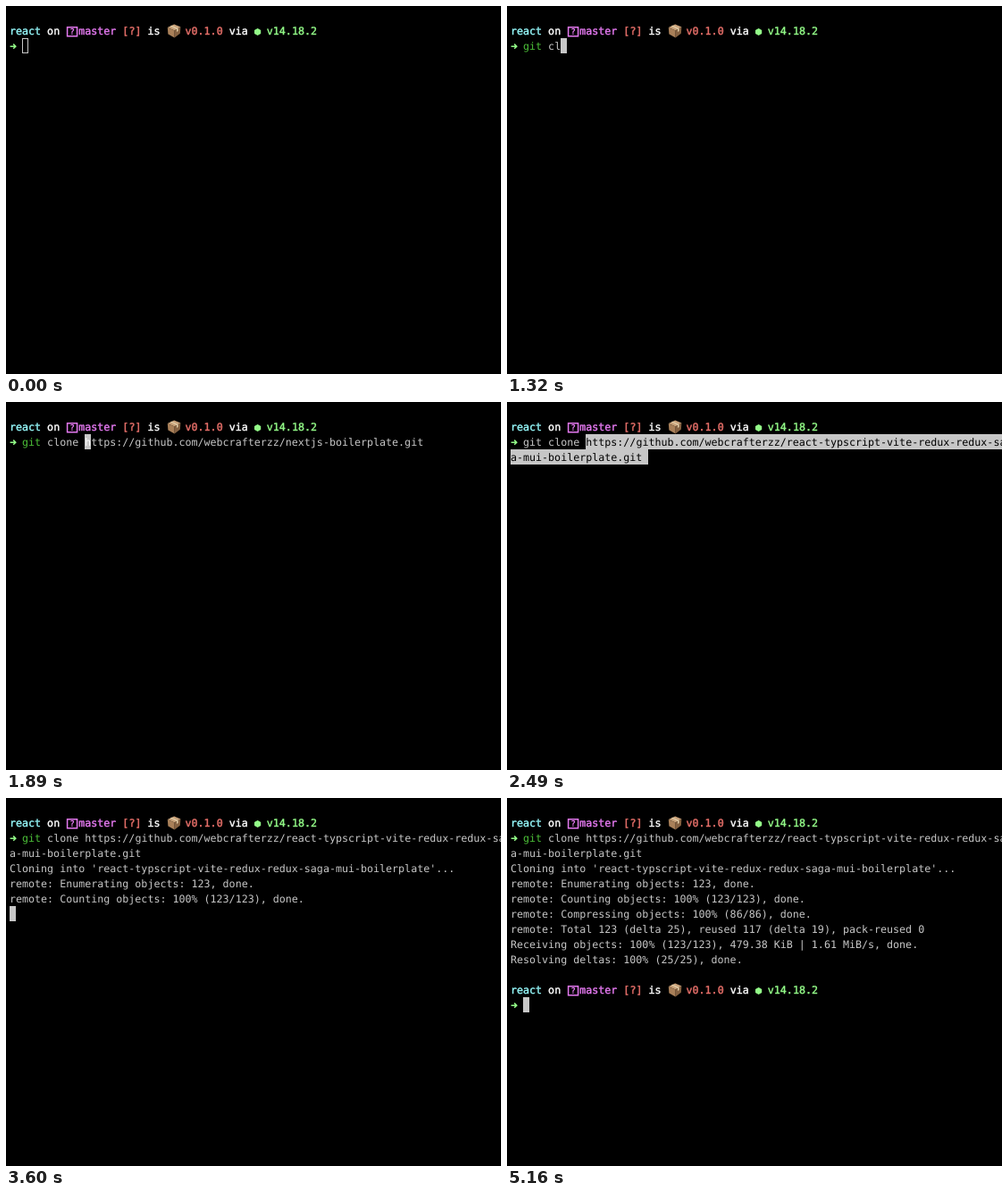
Animation, 554 px wide and 412 px high, one loop 5730 ms. Source, as an HTML page:

```html
<!DOCTYPE html>
<html lang="en">
<head>
<meta charset="utf-8">
<title>Terminal</title>
<style>
  html, body { margin: 0; width: 100%; height: 100%; overflow: hidden; background: #000; }
  #term {
    position: relative; width: 554px; height: 412px; overflow: hidden; background: #000;
    font: 11.66px/19px "DejaVu Sans Mono", monospace;
    color: #c7c7c7; text-rendering: geometricPrecision; font-variant-ligatures: none;
  }
  #term > * { position: absolute; height: 17px; white-space: pre; }
  .bold { -webkit-text-stroke: .4px currentColor; }
  .white { color: #fff; }
  .cyan { color: #96fafc; }
  .pink { color: #e67af2; }
  .red { color: #e8706a; }
  .lime { color: #93fb88; }
  .green { color: #4cc038; }
  .pasted { background: #c7c7c7; color: #000; }
  .block { width: 7px; background: #c7c7c7; color: #fff; }
  .hollow { width: 7px; box-sizing: border-box; border: 1px solid #c7c7c7; }
  svg { overflow: visible; }
</style>
</head>
<body>
<div id="term"></div>
<script>
const LOOP = 5730, CELL = 7.02, LINE = 17, LEFT = 4, TOP = 19;
const term = document.getElementById('term');
const items = [];

function place(el, row, col, from, to) {
  el.style.left = LEFT + col * CELL + 'px';
  el.style.top = TOP + row * LINE + 'px';
  term.append(el);
  items.push({ el, from, to });
}

function put(row, col, text, cls = '', from = 0, to = LOOP) {
  const el = document.createElement('span');
  el.className = cls;
  el.textContent = text;
  place(el, row, col, from, to);
}

function icon(row, col, shapes, from) {
  const el = document.createElementNS('http://www.w3.org/2000/svg', 'svg');
  el.setAttribute('width', 16);
  el.setAttribute('height', LINE);
  el.innerHTML = shapes;
  place(el, row, col, from, LOOP);
}

const BRANCH = `<rect x="1.6" y="4.8" width="11" height="10" fill="none" stroke="#e67af2" stroke-width="1.5"/>
  <text x="7.1" y="13.2" text-anchor="middle" font-size="9.5" font-weight="bold" fill="#e67af2">?</text>`;
const PARCEL = `<g transform="translate(-.2 .4)">
  <path d="M1 4.6L8.4 1L15.6 4L8.8 8Z" fill="#c9a27a"/>
  <path d="M1 4.6L8.8 8V16L1.6 12Z" fill="#a98059"/>
  <path d="M8.8 8L15.6 4L15 11.4L8.8 16Z" fill="#866242"/>
  <path d="M4 3.1L5.6 2.4L12.8 5.6V8.6L11.2 9.5V6.6Z" fill="#e0cba6"/></g>`;
const HEXAGON = '<path d="M3.6 6L7.2 8V12L3.6 14L0 12V8Z" fill="#93fb88"/>';
const ARROW = '<path d="M.6 9.2H6.4M4.2 6.6L6.8 9.2L4.2 11.8" fill="none" stroke="#93fb88" stroke-width="1.5"/>';

function prompt(row, from) {
  const words = [
    [0, 'react', 'cyan'], [6, 'on', 'white'], [11, 'master', 'pink'], [18, '[?]', 'red'],
    [22, 'is', 'white'], [28, 'v0.1.0', 'red'], [35, 'via', 'white'], [41, 'v14.18.2', 'lime']
  ];
  for (const [col, text, color] of words) put(row, col, text, 'bold ' + color, from);
  icon(row, 9, BRANCH, from);
  icon(row, 25, PARCEL, from);
  icon(row, 39, HEXAGON, from);
  icon(row + 1, 0, ARROW, from);
}

const BASE = 'https://github.com/webcrafterzz/';
const REPO = 'react-typscript-vite-redux-redux-saga-mui-boilerplate';
const url = BASE + REPO + '.git';
const head = url.slice(0, 68), tail = url.slice(68);
const hint = 'clone ' + BASE + 'nextjs-boilerplate.git';

prompt(0, 0);

// Typing the command
put(1, 2, 'g', 'bold red', 660, 780);
put(1, 2, 'gi', 'bold red', 780, 930);
put(1, 2, 'git', 'green', 930, 2430);
put(1, 6, 'c', '', 1200, 1320);
put(1, 6, 'cl', '', 1320, 1380);
put(1, 6, hint, '', 1380, 2400);
put(1, 6, 'clone', '', 2400);

// Pasting the address, then running it
put(1, 2, 'git', '', 2430, 2790);
put(1, 2, 'git', 'green', 2790);
put(1, 12, head, 'pasted', 2460, 2790);
put(2, 0, tail, 'pasted', 2460, 2790);
put(1, 12, head, '', 2790);
put(2, 0, tail, '', 2790);
put(3, 0, `Cloning into '${REPO}'...`, '', 2910);

// Output
const receiving = n =>
  `Receiving objects: ${String(Math.floor(n / 1.23)).padStart(3)}% (${n}/123)`;
put(4, 0, 'remote: Enumerating objects: 123, done.', '', 3570);
put(5, 0, 'remote: Counting objects: 100% (123/123), done.', '', 3600);
put(6, 0, 'remote: Compressing objects: 100% (86/86), done.', '', 3660);
put(7, 0, 'remote: Total 123 (delta 25), reused 117 (delta 19), pack-reused 0', '', 3750);
put(8, 0, receiving(30), '', 3750, 3810);
put(8, 0, receiving(76), '', 3810, 3870);
put(8, 0, receiving(123) + ', 479.38 KiB | 1.61 MiB/s, done.', '', 3870);
put(9, 0, 'Resolving deltas: 100% (25/25), done.', '', 3930);

prompt(11, 5100);

// Cursor stops: time, row, column, covered character
const stops = [
  [240, 1, 2], [660, 1, 3], [780, 1, 4], [930, 1, 5], [1020, 1, 6], [1200, 1, 7],
  [1320, 1, 8], [1380, 1, 8, 'o'], [1500, 1, 9, 'n'], [1740, 1, 10, 'e'],
  [1800, 1, 11], [1890, 1, 12, 'h'], [2400, 1, 12], [2460, 2, 21], [2820, 3, 0],
  [2910, 4, 0], [3570, 5, 0], [3600, 6, 0], [3660, 7, 0], [3750, 8, 0],
  [3870, 9, 0], [3960, 10, 0], [5070, 11, 0], [5100, 12, 2]
];
put(1, 2, '', 'hollow', 0, 240);
stops.forEach(([time, row, col, char = ''], i) =>
  put(row, col, char, 'block', time, i + 1 < stops.length ? stops[i + 1][0] : LOOP));

const start = performance.now();
function draw(now) {
  const t = Math.max(0, now - start) % LOOP;
  for (const { el, from, to } of items)
    el.style.visibility = t >= from && t < to ? 'visible' : 'hidden';
  requestAnimationFrame(draw);
}
draw(start);
</script>
</body>
</html>
```
